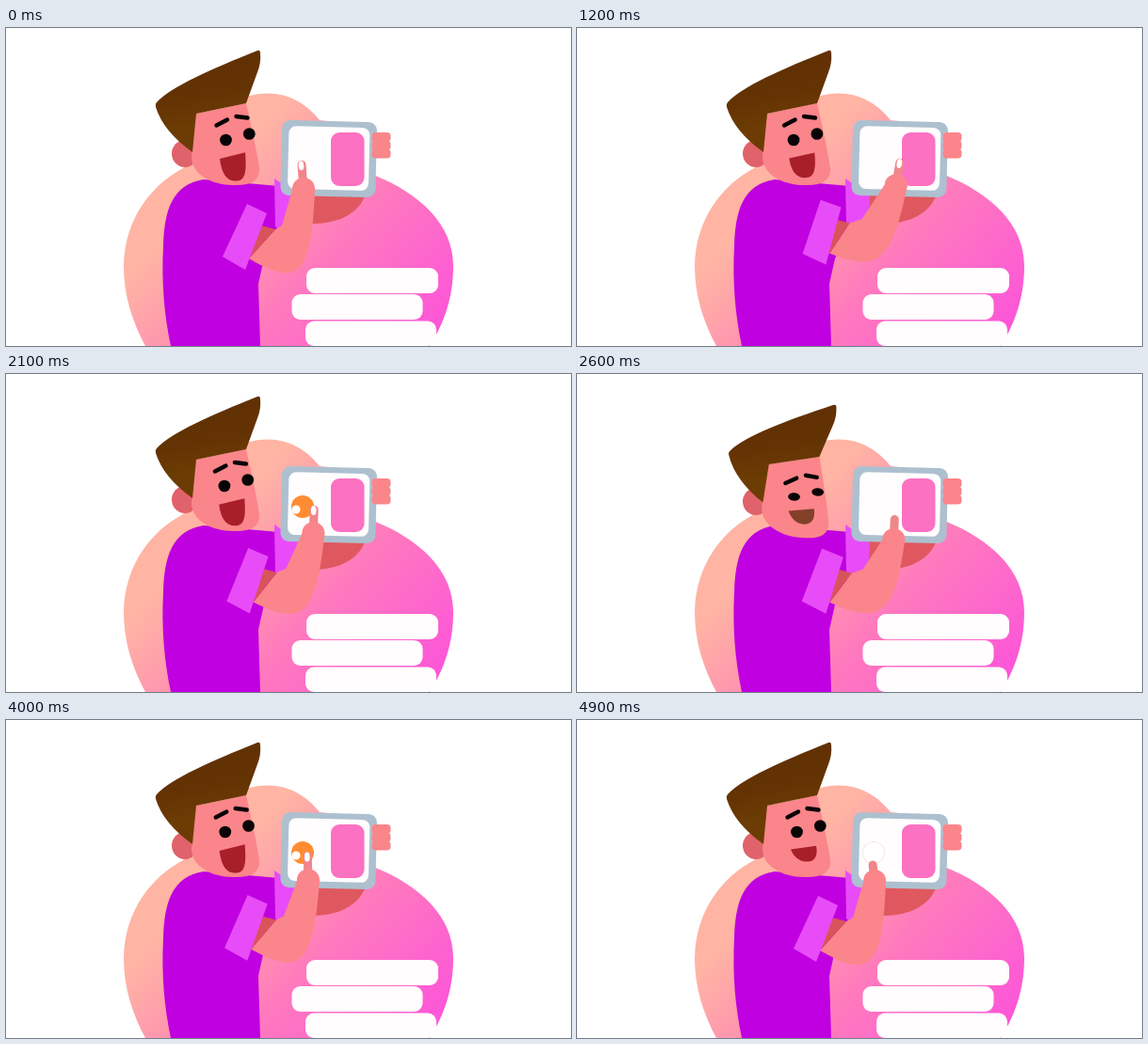
These frames come from a looping animation (600 px wide and 338 px high, 5 s). An HTML page with a canvas:

```html
<!DOCTYPE html>
<html lang="en">
<head>
<meta charset="utf-8">
<title>Tablet swipe</title>
<style>
html, body { margin: 0; width: 100%; height: 100%; overflow: hidden; background: #fff; }
canvas { display: block; }
</style>
</head>
<body>
<canvas id="stage" width="600" height="338"></canvas>
<script>
const g = document.getElementById('stage').getContext('2d');
const LOOP = 5000, STEP = 100, CYCLE = 970, REACH = 490;
const SKIN = '#fa858a', LILAC = '#e84cf8', INK = '#080406', WHITE = '#fffdfe';

// mouth depth at a few moments of one cycle
const talk = [[0, 27], [50, 15], [120, 27], [490, 16], [630, 27], [660, 15], [700, 3], [CYCLE, 27]];

const mix = (a, b, u) => a + (b - a) * u;
function ease(from, to, t) {
  const u = Math.min(1, Math.max(0, (t - from) / (to - from)));
  return u * u * (3 - 2 * u);
}

// everything that moves follows from these few values
function pose(t) {
  const i = talk.findIndex(k => k[0] > t), [t0, m0] = talk[i - 1], [t1, m1] = talk[i];
  const back = Math.min(1, Math.max(0, (t - REACH) / 340));
  return {
    swipe: ease(40, REACH, t) - ease(REACH, 760, t),
    turn: ease(220, REACH, t) - ease(REACH, 820, t),
    dip: Math.sin(Math.PI * back),
    tap: Math.exp(-(((t - 50) / 25) ** 2)),
    mouth: mix(m0, m1, (t - t0) / (t1 - t0))
  };
}

function fill(color, d) {
  g.fillStyle = color;
  g.fill(new Path2D(d));
}
function poly(color, ...pts) {
  fill(color, 'M' + pts.join('L') + 'Z');
}
function box(color, x, y, w, h, r) {
  g.fillStyle = color;
  g.beginPath();
  g.roundRect(x, y, w, h, r);
  g.fill();
}
function oval(color, x, y, rx, ry = rx, turn = 0) {
  g.fillStyle = color;
  g.beginPath();
  g.ellipse(x, y, rx, ry, turn, 0, 7);
  g.fill();
}
function line(color, width, x1, y1, x2, y2) {
  g.strokeStyle = color;
  g.lineWidth = width;
  g.lineCap = 'round';
  g.beginPath();
  g.moveTo(x1, y1);
  g.lineTo(x2, y2);
  g.stroke();
}
function blend(x1, y1, x2, y2, ...colors) {
  const f = g.createLinearGradient(x1, y1, x2, y2);
  colors.forEach((c, i) => f.addColorStop(i / (colors.length - 1), c));
  return f;
}

const blobFill = blend(190, 200, 397, 386, '#ffb4a4', '#ff97ae', '#ff79bd', '#fd69cb', '#fd56d8');
const hairFill = blend(220, 40, 232, 98, '#613104', '#643303', '#6c3c04');

function scene() {
  fill(blobFill, 'M148 338C134 312 125 284 125 253C126 201 156 166 188 149C205 128 222 84 255 73C290 63 315 76 333 98L390 104L390 156C440 176 475 209 475 253C475 288 464 316 450 338Z');
  fill('#c000e0', 'M175 338C168 305 165 270 167 232C168 195 176 166 210 161L290 168L290 212L274 245L268 272L270 338Z');
  fill('#e0585f', 'M306 176L382 176C376 196 354 208 326 208L306 206Z');
  poly(LILAC, [285, 160], [311, 178], [309, 210], [294, 218], [286, 211]);
  box(WHITE, 319, 255, 140, 27, 9);
  box(WHITE, 303.5, 283, 139, 27, 9);
  box(WHITE, 318, 311.5, 139, 26.5, 9);
}

function tablet() {
  g.save();
  g.translate(342.7, 139);
  g.rotate(0.025);
  box('#adc0cf', -50.5, -40, 101, 80, 9);
  box(WHITE, -43, -34, 86, 67, 8);
  g.restore();
  box('#fc71c1', 345, 111, 35.5, 57, 9);
  for (let i = 0; i < 3; i++) box(SKIN, 388.5, 111 + i * 8.8, 20, 10, 4);
}

function head({ swipe, turn, dip, mouth }) {
  oval('#e0626a', 190, 133.5 + 2 * dip, 14, 14.5);
  g.save();
  g.translate(205, 122 + 5 * dip);
  g.rotate(turn * 0.122);
  g.translate(-205, -122);
  fill(SKIN, 'M201 91L197 137C197 155 218 167 241 167Q270 168 269 150Q268 138 255 80Z');
  fill(hairFill, 'M160 79C176 62 217 44 267 24Q270 23 270 27Q271 37 267 47L255 80L202 91L198 132Q167 110 159 84Q158 81 160 79Z');

  const ry = 6.3 - 2 * dip, gaze = -9 * swipe;
  g.save();
  g.translate(gaze, 5 * dip);
  oval(INK, 233.5, 119, 6.4, ry);
  oval(INK, 258.3, 112.5, 6.4, ry);
  g.translate(0, 2.5 * dip - 2 * turn);
  line(INK, 4.4, 223.5, 103.5, 235, 97.5);
  line(INK, 4.4, 244.5, 94, 256.5, 95.5);
  g.restore();

  g.translate(gaze / 2, 2 * dip);
  const tilt = mouth / 8, top = 135.5, low = top + mouth;
  const red = [mix(168, 130, dip), mix(31, 64, dip), 41].map(Math.round);
  fill(`rgb(${red})`, `M227 ${top + tilt}L254 ${top - tilt}C256 ${low - 7} 253 ${low} 244 ${low}
    C234 ${low} 229 ${low - 8} 227 ${top + tilt}Z`);
  g.restore();
}

function arm({ swipe, dip, tap }) {
  const at = (x1, y1, x2, y2, dx, dy) =>
    [mix(x1, x2, swipe) + dx * dip, mix(y1, y2, swipe) + dy * dip];
  const [x1, y1] = at(256, 187, 263, 176, 2, 2);
  const [x2, y2] = at(277, 197, 286, 180, 3, 3);
  const [x3, y3] = at(230, 243, 255, 235, 1, 1);
  const [ix, iy] = at(293, 210, 318, 192, 3, 3);
  const [kx, ky] = at(325, 268, 348, 228, 5, 4);
  const [hx, hy] = at(316, 171, 375, 161, 2, 8);
  const [fx, fy] = at(314, 145 + 9 * tap, 389, 140, 0, 11);
  const x4 = x3 + x2 - x1 + 3, y4 = y3 + y2 - y1 + 4;
  const sx = x2 + 9, sy = y2 + 17, bx = x4 + 4, by = y4 - 12;
  const len = Math.hypot(hx - kx, hy - ky);
  const nx = (ky - hy) / len * 12, ny = (hx - kx) / len * 12;

  line('#f0868a', 9, hx, hy, fx, fy);
  if (tap < 0.5 && dip < 0.3) oval('#fff', fx - 0.5, fy + 1, 2.8, 5, Math.atan2(fx - hx, hy - fy));
  fill(SKIN, `M${sx} ${sy}L${ix} ${iy}L${hx - nx} ${hy - ny}L${hx + nx} ${hy + ny}
    C${kx} ${ky} ${kx - 17} ${ky + 6} ${bx} ${by}Z`);
  oval(SKIN, hx, hy, 12);
  poly('#d9535b', [mix(x2, x4, 0.22), mix(y2, y4, 0.22)], [sx, sy], [bx, by], [x4, y4 - 9]);
  poly(LILAC, [x1, y1], [x2, y2], [x4, y4], [x3, y3]);
}

function dot(t) {
  if (t < 40 || t > 160) return;
  const lit = t > 80;
  oval(lit ? '#ff8c32' : '#f3dcdc', 315, 141, 12);
  if (lit) oval('#fff', 308, 144, 4.5);
  else oval('#fff', 315, 141, 11.3);
}

function draw(now) {
  const t = Math.floor(now % LOOP / STEP) * STEP % CYCLE, p = pose(t);
  g.clearRect(0, 0, 600, 338);
  scene();
  tablet();
  dot(t);
  head(p);
  arm(p);
  requestAnimationFrame(draw);
}
draw(performance.now());
</script>
</body>
</html>
```
